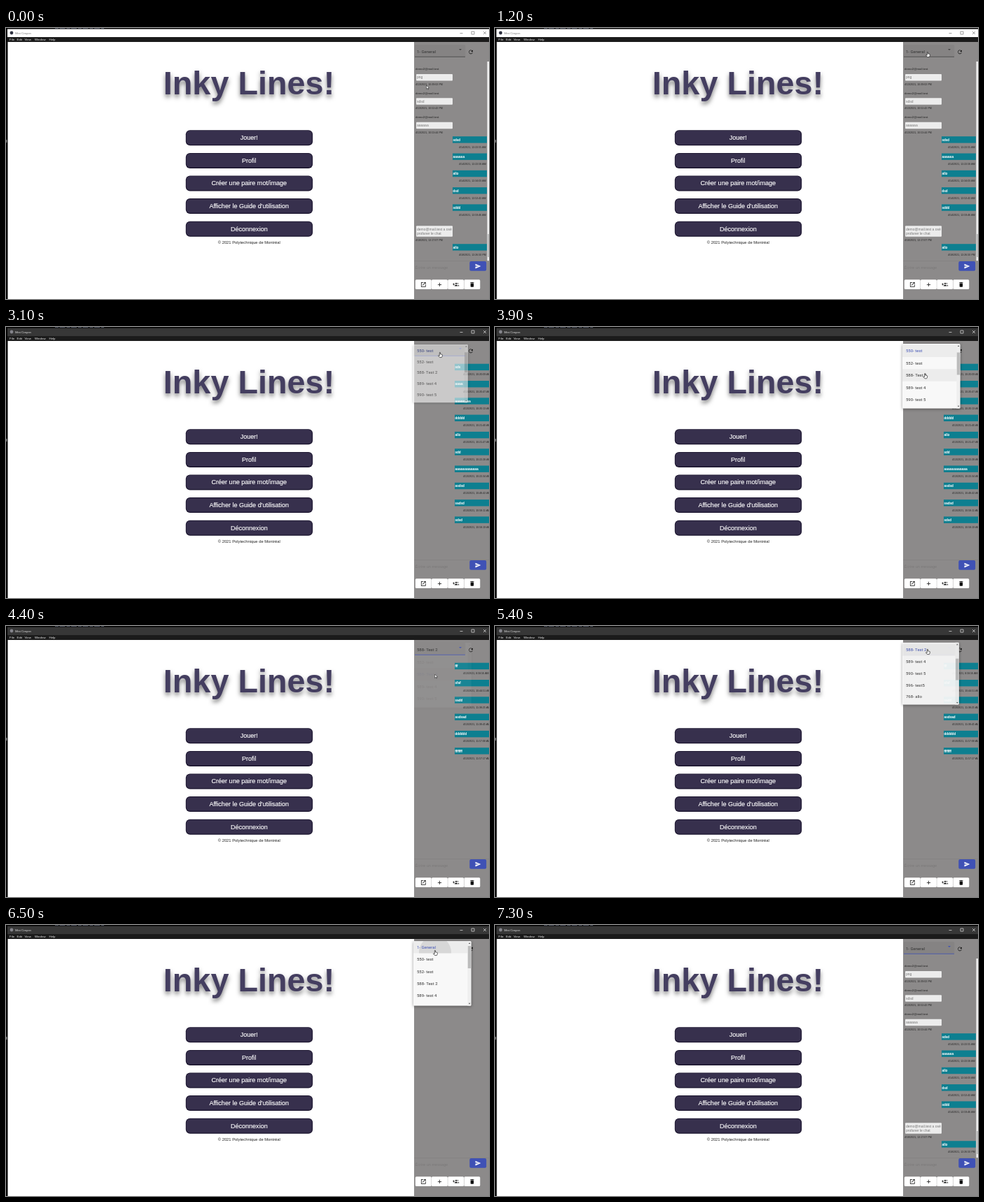
Write an HTML page that moves like this. It is 690 px wide and 388 px high and loops after 7600 ms.

```html
<!DOCTYPE html>
<html lang="fr">
<head>
<meta charset="utf-8">
<title>Mini Crayon</title>
<style>
html, body { margin: 0; width: 100%; height: 100%; overflow: hidden; background: #000; }
svg { display: block; width: 100vw; height: 100vh; font-family: "Liberation Sans", Arial, sans-serif; }
.logo { font-weight: bold; filter: drop-shadow(0 4px 3px rgba(0, 0, 0, .5)); }
.sheet { filter: drop-shadow(0 1px 2px rgba(0, 0, 0, .4)); }
.room { font-family: Roboto, "Liberation Sans", sans-serif; }
.bright { stroke: #fff; stroke-width: .15px; }
</style>
</head>
<body>
<svg id="stage" viewBox="0 0 690 388" preserveAspectRatio="none"></svg>
<script>
const LOOP = 7600, STEP = 100, ROW = 17.4, PIVOT = 34.2;
const INDIGO = '#3f51b5', TEAL = '#0d7f90';
const rooms = ['1- General', '550- test', '552- test', '588- Test 2', '589- test 4',
  '590- test 5', '596- test5', '768- allo', '769- allo2'];

// Dropdown sessions: opening, closing, top edge, selected row
const sessions = [
  { open: 1450, close: 2360, top: 25.5, sel: 0 },
  { open: 3040, close: 4305, top: 24, sel: 1 },
  { open: 5302, close: 6560, top: 23, sel: 3 }
];
const clicks = [2200, 4200, 6400];

// Pointer stops: time, x, y
const stops = [
  [0, 602, 85], [300, 602, 85], [1200, 618, 38], [1600, 618, 38], [2100, 612, 60],
  [2400, 612, 60], [2900, 620, 40], [3300, 620, 40], [4000, 614, 72], [4400, 614, 72],
  [5200, 618, 37], [5500, 618, 37], [6000, 613, 40], [6700, 613, 40], [7150, 540, 256]
];

const icons = {
  refresh: 'M17.65 6.35A8 8 0 1 0 19.73 14h-2.08A6 6 0 1 1 16.24 7.76L13 11h7V4z',
  send: 'M2 21l21-9L2 3v7l15 2-15 2z',
  open: 'M19 19H5V5h7V3H3v18h18v-9h-2zM14 3v2h3.6l-9.8 9.8 1.4 1.4L19 6.4V10h2V3z',
  add: 'M19 13h-6v6h-2v-6H5v-2h6V5h2v6h6z',
  group: 'M8 10H5V7H3v3H0v2h3v3h2v-3h3zM13 5a3 3 0 0 1 0 6a3 3 0 0 1 0-6z' +
    'M7 16.5C7 14.5 11 13 13 13s6 1.5 6 3.5V18H7zM18 5a3 3 0 0 1 0 6c1-2 1-4 0-6z' +
    'M20 13.2c2 .6 4 1.7 4 3.3V18h-3v-1.5c0-1.3-.6-2.4-1-3.3z',
  trash: 'M6 19c0 1.1.9 2 2 2h8c1.1 0 2-.9 2-2V7H6zM19 4h-3.5l-1-1h-5l-1 1H5v2h14z',
  hand: 'M9 11V4a1.5 1.5 0 0 1 3 0v5l6 1.5c1 .3 1.5 1 1.4 2L18 19c-.2 1-1 2-2 2h-5.5' +
    'c-.6 0-1-.2-1.5-.7L4 15l1.2-1.2L9 15z',
  arrow: 'M6 3v17l4-4 3 6 2.5-1.2-3-5.8H18z'
};

const rect = (x, y, w, h, fill, more = '') =>
  `<rect x="${x}" y="${y}" width="${w}" height="${h}" fill="${fill}" ${more}/>`;
const text = (s, x, y, size, fill, more = '') =>
  `<text x="${x}" y="${y}" font-size="${size}" fill="${fill}" ${more}>${s}</text>`;
const icon = (name, x, y, size, fill, more = '') =>
  `<path d="${icons[name]}" fill="${fill}" ${more}
    transform="translate(${x - size / 2} ${y - size / 2}) scale(${size / 24})"/>`;
const clamp = v => Math.max(0, Math.min(1, v));
const ease = (t, a, b) => { const k = clamp((t - a) / (b - a)); return k * k * (3 - 2 * k); };

function page() {
  const labels = ['Jouer!', 'Profil', 'Créer une paire mot/image',
    "Afficher le Guide d'utilisation", 'Déconnexion'];
  return '<path d="M70 .5h70" stroke="#4a4f5c" stroke-dasharray="5 1.500 8 2"/>' +
    rect(0, 160, 1.5, 4, '#777') +
    rect(2.5, 20, 580.5, 368, '#fff') +
    text('Inky Lines!', 347, 94.5, 46.8, '#443e60', 'class="logo" text-anchor="middle"') +
    labels.map((s, i) => {
      const y = 146.3 + i * 32.6;
      return rect(256.8, y, 181.4, 22, '#19132c', 'rx="6"') +
        rect(257.7, y + .8, 179.6, 19.9, '#37304d', 'rx="5.2"') +
        text(s, 347.3, y + 13.9, 9.05, '#fff', 'class="bright" text-anchor="middle"');
    }).join('') +
    text('© 2021 Polytechnique de Montréal', 347.3, 309.3, 5.8, '#222', 'text-anchor="middle"');
}

function titleBar(focused) {
  const ink = focused ? '#e4e4e4' : '#777';
  const menu = [['File', 5], ['Edit', 15.5], ['View', 26.5], ['Window', 41], ['Help', 61.5]];
  return rect(2, 1.5, 688, 11.5, focused ? '#373737' : '#fff') +
    rect(2, 13, 688, 7, '#1b1b1b') +
    `<circle cx="8" cy="7" r="2.4" fill="${focused ? '#85858c' : '#2f3241'}"/>` +
    text('Mini Crayon', 13, 8.6, 4.3, ink) +
    `<path d="M648.500 7.500h4M665 5h4v4h-4zM682 5l4 4m0-4l-4 4" fill="none" stroke="${ink}" stroke-width=".7"/>` +
    menu.map(([s, x]) => text(s, x, 17.9, 4.4, '#eee')).join('');
}

const stamp = (s, x, y) => text(s, x, y + 1.3, 3.65, '#222');

function sent(s, date, y, x) {
  return rect(x, y - 4.8, 49, 9.4, TEAL) +
    text(s, x + .5, y + 1.6, 5, '#fff', 'class="bright"') +
    stamp(date, x === 638 ? 647 : 653, y + 10.4);
}

function received(lines, date, y) {
  const h = lines.length > 1 ? 15.5 : 9.5;
  return rect(586, y - 4.8, 52, h, '#ececec', 'rx="1"') +
    lines.map((s, i) => text(s, 587, y + 1.7 + i * 6, 5, '#777')).join('') +
    stamp(date, 585, y + h + .4);
}

function general() {
  const left = [['png', '4/13/2021, 10:39:02 PM'], ['sdsd', '4/13/2021, 10:52:42 PM'],
    ['aaaaaa', '4/13/2021, 10:53:44 PM']];
  const right = [['sdsd', '12:22:55'], ['aaaaaa', '12:22:58'], ['allo', '12:34:03'],
    ['dsd', '12:52:42'], ['sddd', '12:59:46']];
  return left.map(([s, d], i) => {
    const y = 70.7 + i * 34.4;
    return text('demo2@mail.test', 585, y - 10.3, 4.3, '#222') + received([s], d, y);
  }).join('') +
    right.map(([s, h], i) => sent(s, `4/14/2021, ${h} AM`, 160 + i * 24.3, 638)).join('') +
    received(['demo@mail.test a osé', 'profaner le chat'], '4/18/2021, 12:17:07 PM', 288) +
    sent('allo', '4/18/2021, 12:26:50 PM', 314, 638) +
    rect(687.5, 48, 2.5, 285.5, '#f1f1f1') + rect(687.5, 295, 2.5, 33, '#c1c1c1');
}

const thread = list => list.map(([s, h], i) =>
  sent(s, `4/13/2021, ${h} AM`, 57.5 + i * 24.3, 641)).join('');

const threads = {
  0: general(),
  1: thread([['sds', '10:20:09'], ['aaaa', '10:20:47'], ['aaaaaaaa', '10:20:13'],
    ['ddddd', '10:21:40'], ['allo', '10:21:47'], ['sdd', '10:22:28'],
    ['aaaaaaaaaaaa', '10:22:34'], ['asdsd', '10:48:42'], ['sadsd', '10:58:11'],
    ['sdsd', '10:58:19']]),
  3: thread([['fff', '8:58:56'], ['sfaf', '10:44:51'], ['sadd', '11:38:25'],
    ['asdsad', '11:38:45'], ['dddddd', '11:57:08'], ['ffffffff', '11:57:17']])
};

function sideBar(t, room) {
  const loading = (t >= 2400 && t < 2500) || (t >= 6400 && t < 6700);
  const line = t >= 1450 ? INDIGO : '#444';
  return rect(583, 20, 107, 368, '#8c8a8a') +
    (loading ? '' : threads[room]) +
    rect(583.5, 24, 73, 17.4, '#858383', 'rx="2"') +
    rect(584, 40.8, 72, .8, line) +
    text(rooms[room], 587, 36.2, 6, '#333', 'class="room"') +
    `<path d="M647 30h4l-2 2z" fill="${line}"/>` +
    icon('refresh', 664, 34.3, 8.6, '#111') +
    rect(583, 333.5, 107, .5, '#7c7a7a') +
    text('Écrire un message', 584.5, 345, 5.6, '#7b7979') +
    rect(662.3, 334, 23.9, 13.8, INDIGO, 'rx="2"') +
    icon('send', 674.3, 341, 9, '#fff') +
    ['open', 'add', 'group', 'trash'].map((n, i) =>
      rect(584.8 + i * 23.2, 360.3, 22.9, 13.6, '#fff', 'rx="1.5"') +
      icon(n, 596.3 + i * 23.2, 367.3, 9, '#111')).join('');
}

function pointer(t) {
  const i = stops.findLastIndex(s => s[0] <= t);
  const a = stops[i], b = stops[i + 1] || a;
  const k = b === a ? 0 : ease(t, a[0], b[0]);
  return { x: a[1] + (b[1] - a[1]) * k, y: a[2] + (b[2] - a[2]) * k };
}

function dropdown(t, room, p) {
  const n = sessions.findIndex(s => t > s.open && t < s.close + 100);
  if (n < 0) return '';
  const s = sessions[n], H = 92.8;
  const k = clamp((t - s.open) / 120);
  const alpha = clamp(k * 1.15) * (1 - clamp((t - s.close) / 100));
  const w = 73 + 9.5 * k, bar = 582.3 + w - 5.5;
  const start = s.sel * ROW - (PIVOT - ROW / 2 - s.top) * (n > 0);
  const scroll = start * (n === 2 ? 1 - ease(t, 5700, 6200) : 1);
  const rows = rooms.map((name, i) => {
    const y = s.top + i * ROW - scroll;
    const hover = p.y - 3 >= y && p.y - 3 < y + ROW;
    const r = (t - clicks[n]) * .23;
    return (hover || i === room ? rect(582, y, w, ROW, '#ececec') : '') +
      (hover && r > 0 ? `<clipPath id="row"><rect x="582" y="${y}" width="${w - 5}" height="${ROW}"/></clipPath>
        <circle cx="${p.x}" cy="${p.y - 1}" r="${r}" fill="#000" opacity=".09" clip-path="url(#row)"/>` : '') +
      text(name, 587, y + 10.8, 6, i === room ? INDIGO : '#333', 'class="room"');
  }).join('');
  return `<g class="sheet" opacity="${alpha}"
      transform="translate(0 ${PIVOT}) scale(1 ${.8 + .2 * k}) translate(0 ${-PIVOT})">
    <clipPath id="sheet"><rect x="582" y="${s.top}" width="${w}" height="${H}" rx="1.5"/></clipPath>
    <g clip-path="url(#sheet)">` +
    rect(582, s.top, w, H, '#f8f8f8') + rows +
    rect(bar, s.top, 6, H, '#efefef') +
    rect(bar + .5, s.top + 7 + scroll * .345, 4.7, 32, '#bdbdbd') +
    `<path d="M${bar + 1.5} ${s.top + 4}l1.300-1.800 1.300 1.800zM${bar + 1.5} ${s.top + H - 4}l1.300 1.800 1.300-1.800z" fill="#555"/>
    </g></g>`;
}

function cursor(t, p) {
  if (t >= 7200) return '';
  const onList = sessions.some(s => t > s.open && t < s.close);
  const onField = p.y < 42 && p.x > 583;
  return icon(onList || onField ? 'hand' : 'arrow', p.x + .5, p.y, onList || onField ? 9.5 : 7.5,
    '#fff', 'stroke="#111" stroke-width="1.6"');
}

const stage = document.getElementById('stage');
const backdrop = page();
let last = -1;

function draw(now) {
  const t = Math.min(Math.floor(now % LOOP / STEP) * STEP, 7300);
  if (t !== last) {
    last = t;
    const room = t < 2400 ? 0 : t < 4300 ? 1 : t < 6400 ? 3 : 0;
    const p = pointer(t);
    stage.innerHTML = backdrop + titleBar(t >= 1450) + sideBar(t, room) +
      dropdown(t, room, p) + cursor(t, p);
  }
  requestAnimationFrame(draw);
}
const begin = performance.now();
requestAnimationFrame(now => draw(Math.max(0, now - begin)));
</script>
</body>
</html>
```
